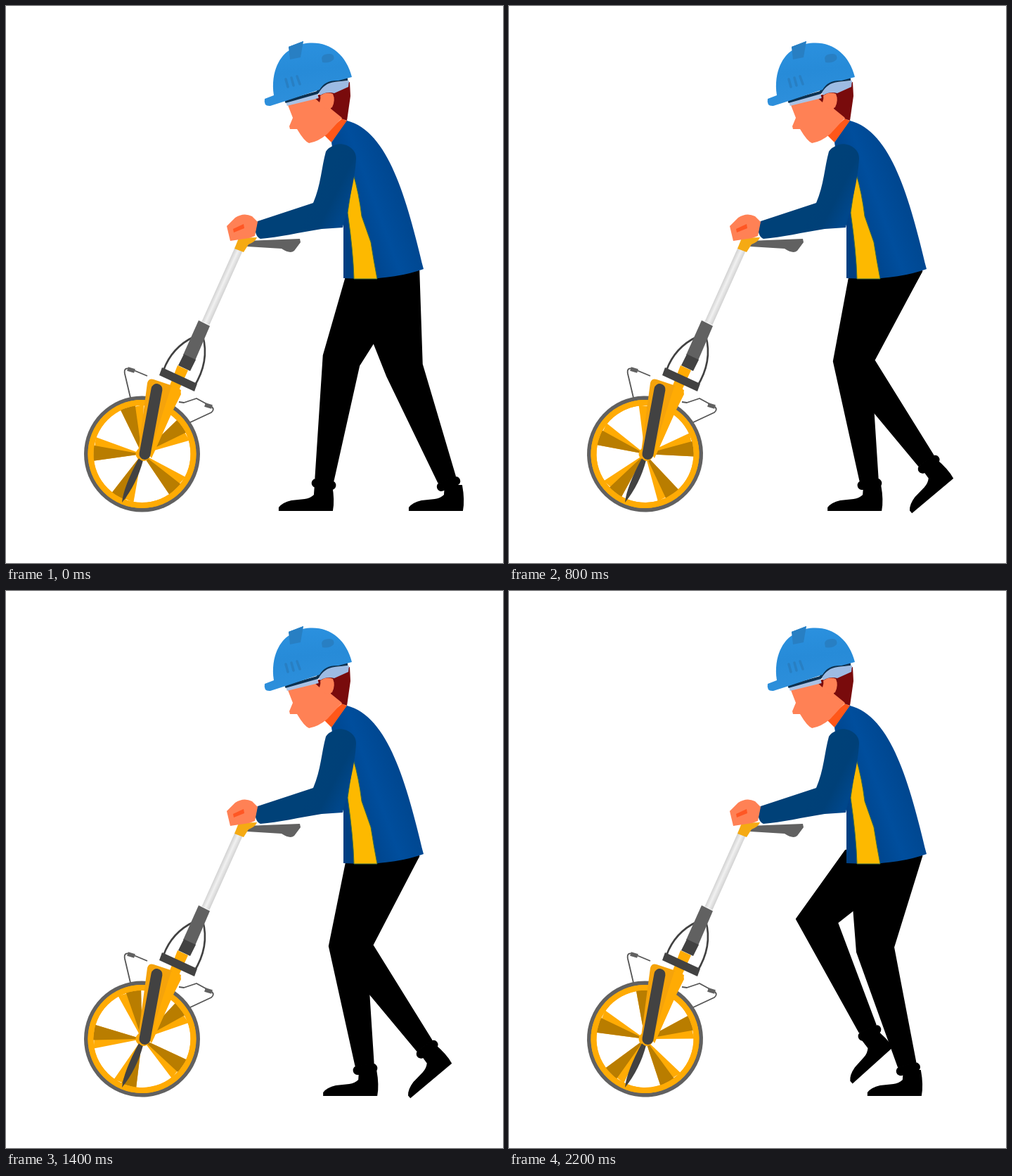
Recreate the animation shown at these times as an HTML page with a canvas. Size 707 by 792 pixels, loop 2.3 s.

```html
<!DOCTYPE html>
<html lang="en">
<head>
<meta charset="utf-8">
<title>Measuring wheel walk</title>
<style>
html, body { margin: 0; width: 100%; height: 100%; overflow: hidden; background: #fff; }
canvas { display: block; }
</style>
</head>
<body>
<canvas id="stage" width="707" height="792"></canvas>
<script>
const ctx = document.getElementById('stage').getContext('2d');
const LOOP = 2300, STEP = 100, RAD = Math.PI / 180;
const YELLOW = '#ffab04', SHADE = '#b97d00', GRAY = '#616161', DARK = '#424242', SKIN = '#ff8155';

function fill(d, color) {
  ctx.fillStyle = color;
  ctx.fill(new Path2D(d));
}

function line(d, color, width, cap = 'butt') {
  ctx.strokeStyle = color;
  ctx.lineWidth = width;
  ctx.lineCap = cap;
  ctx.lineJoin = 'round';
  ctx.stroke(new Path2D(d));
}

function blend(x0, y0, x1, y1, ...colors) {
  const g = ctx.createLinearGradient(x0, y0, x1, y1);
  colors.forEach((c, i) => g.addColorStop(i / (colors.length - 1), c));
  return g;
}

function disc(r, color) {
  ctx.fillStyle = color;
  ctx.beginPath();
  ctx.arc(0, 0, r, 0, 7);
  ctx.fill();
}

// ---- wheel ----
function wedge(from, to, color) {
  const at = (r, a) => ctx.lineTo(r * Math.cos(a * RAD), r * Math.sin(a * RAD));
  ctx.fillStyle = color;
  ctx.beginPath();
  at(5, from);
  at(70, from);
  at(70, to);
  at(5, to);
  ctx.fill();
}

function wheel(t) {
  ctx.save();
  ctx.translate(193.5, 637);
  ctx.rotate(-2 * Math.PI * t / LOOP);
  disc(82.5, GRAY);
  disc(77, YELLOW);
  disc(69, '#fff');
  for (let i = 0; i < 5; i++) {
    const mid = 186 + 72 * i, side = i < 3 ? -1 : 1;
    wedge(mid - 14, mid + 14, YELLOW);
    wedge(mid - 4 * side, mid + 14 * side, SHADE);
  }
  ctx.strokeStyle = YELLOW;
  ctx.lineWidth = 8;
  ctx.beginPath();
  ctx.arc(0, 0, 73, 0, 7);
  ctx.stroke();
  disc(9, YELLOW);
  ctx.restore();
}

// ---- legs: knee x, y, ankle x, y, foot angle for each tenth of a second ----
const GAIT = [
  [477, 504, 453, 673, 0],
  [480, 505, 482, 673, 0],
  [486, 507, 510, 673, 0],
  [501, 510, 538, 673, 0],
  [519, 510, 564, 673, 0],
  [541, 514, 595, 673, 0],
  [565, 518, 625, 673, 0],
  [528, 516, 614, 660, -18],
  [494, 510, 593, 646, -40],
  [463, 495, 555, 636, -45],
  [438, 469, 510, 622, -42],
  [452, 486, 462, 652, -12]
];

function unit(x, y) {
  const n = Math.hypot(x, y);
  return [x / n, y / n];
}

function leg(t, shift) {
  const [kx0, ky, ax0, ay, turn] = GAIT[Math.floor(t / STEP) % GAIT.length];
  const kx = kx0 + shift, ax = ax0 + shift;
  const lift = Math.max(0, Math.min(1, (504 - ky) / 35));
  const [hx, hy] = unit(ax - 530, ay - 400);
  const [sx, sy] = unit(ax - kx, ay - ky);
  const k = 26 + 3 * lift, a = 12.5;
  const pts = [
    [485 - 6 * lift, 382 - 13 * lift],
    [kx - hy * k, ky + hx * k],
    [ax - sy * a, ay + sx * a],
    [ax + sy * a, ay - sx * a],
    [kx + hy * k, ky - hx * k],
    [587, 377]
  ];
  ctx.fillStyle = ctx.strokeStyle = '#000';
  ctx.lineJoin = ctx.lineCap = 'round';
  ctx.lineWidth = 2.5;
  ctx.beginPath();
  pts.forEach(p => ctx.lineTo(...p));
  ctx.closePath();
  ctx.fill();
  ctx.stroke();

  const cx = ax + sx * 7, cy = ay + sy * 7;
  ctx.lineWidth = 13;
  ctx.beginPath();
  ctx.moveTo(cx - sy * 11, cy + sx * 11);
  ctx.lineTo(cx + sy * 11, cy - sx * 11);
  ctx.stroke();

  ctx.save();
  ctx.translate(ax + sx * 22, ay + sy * 22 + (turn ? 0 : 22 * (1 - sy)));
  ctx.rotate(turn * RAD);
  fill('M-11 -14L-12 0Q-17 5 -25 6L-44 8Q-57 11 -62 18L-62 23L15 23Q18 8 14 -14Z', '#000');
  ctx.restore();
}

// ---- measuring device ----
function wires() {
  line('M177 557L169 523Q167 513 177 516L201 526M246 563L253 564L271 558L293 570Q297 574 292 578L262 592', '#555', 1.8);
  line('M173 516L183 519M283 567L293 570', GRAY, 6);
}

function device() {
  fill('M189 643L195 646Q186 680 165 706Q167 684 189 643Z', DARK);
  fill('M244 511L259 518L247 544L249 552L237 576L207 643L198 630Z', YELLOW);
  fill('M201 536Q203 529 210 531L234 539Q238 541 237 546L204 642Q196 652 188 642Q186 638 188 634Z', '#f5a30b');
  fill('M235 541L249 546L248 553L237 575L210 636L206 632Z', YELLOW);
  line('M214.5 545L197.5 637', DARK, 16, 'round');

  line('M268 470Q236 485 224 518M280 469Q290 506 267 542', DARK, 2.6);
  fill('M222 514L272 537L268 548L218 525Z', DARK);
  line('M332 344L284 451', blend(302, 395, 313, 400, '#cfcfcf', '#f1f1f1', '#d4d4d4'), 12);
  fill('M274 447L290 455L269 504L252 496Z', GRAY);
  fill('M253 495L270 503L262 519L245 511Z', DARK);
  fill('M342 334L418 331L419 336L410 348Q404 353 392 345L343 342Z', GRAY);
  fill('M331 330L357 329Q355 335 345 339L338 350L325 345Z', '#f5aa13');
}

// ---- upper body ----
function torso() {
  fill('M485 163C544 178 570 274 594 374Q547 391 480 387L480 306L463 194Z',
    blend(470, 300, 580, 260, '#003f82', '#004e9d', '#004389'));
  const stripe = 'M494 239Q502 266 506 299L519 336Q523 362 528 388L495 388Q494 350 486 294Z';
  fill(stripe, '#fdb900');
  line(stripe, '#43723f', 1);
}

function arm() {
  fill('M463 200C477 190 499 201 498 217C497 245 486 286 479 315L449 317C418 322 387 329 362 331C354 328 352 313 358 306L437 280C448 255 449 228 455 207Q458 202 463 200Z',
    blend(445, 260, 488, 282, '#004178', '#004078', '#00478b'));
}

function hand() {
  fill('M314 313L326 301Q338 293 350 299L358 307L354 327L346 330L319 334Z', SKIN);
  fill('M323 317L338 310L339 316L324 322Z', '#ff5724');
}

function head() {
  fill('M452 183L478 160L486 164L463 194Z', '#ff5719');
  fill('M441 128L489 108L490 128L485 163L477 160L459 147L466 132Z', '#790b0c');
  fill('M401 141L446 126L461 126L462 146L478 159L457 182Q444 193 431 195Q424 192 414 175L404 175L403 171L408 159Z', SKIN);
  fill('M437 129L449 125L446 137Z', '#790b0c');
  fill('M447 128Q455 121 465 125Q469 134 464 144Q457 149 450 143Z', SKIN);
  line('M399 139L444 128', '#a9c2e5', 6);
  fill('M445 124Q451 108 467 108L488 106L487 115L467 124Q456 121 447 127Z', '#9dbbe3');
  line('M397 136L443 123Q451 108 467 106L486 104', '#0d3150', 4);

  fill('M381 127C376 92 391 70 403 63L402 58L423 50L422 54C455 47 483 65 492 101L473 106Q454 105 446 119L398 135L376 142Q366 143 368 132Z',
    blend(420, 50, 430, 135, '#2b91df', '#278bd8', '#2d8fdb'));
  fill('M402 58L423 50L419 73L404 76Z', '#287fc3');
  fill('M449 74Q450 68 460 68Q468 68 466 76Q460 82 450 80Z', '#287fc3');
  line('M398 104L401 115M406 102L409 113M414 100L418 111', '#287fc3', 3.5, 'round');
}

function draw(t) {
  ctx.fillStyle = '#fff';
  ctx.fillRect(0, 0, 707, 792);
  wires();
  wheel(t);
  device();
  leg(t + 600, 2);
  leg(t, 0);
  head();
  torso();
  arm();
  hand();
}

const start = performance.now();
function tick(now) {
  const t = Math.max(0, now - start) % LOOP;
  draw(Math.floor(t / STEP) * STEP);
  requestAnimationFrame(tick);
}
draw(0);
requestAnimationFrame(tick);
</script>
</body>
</html>
```
